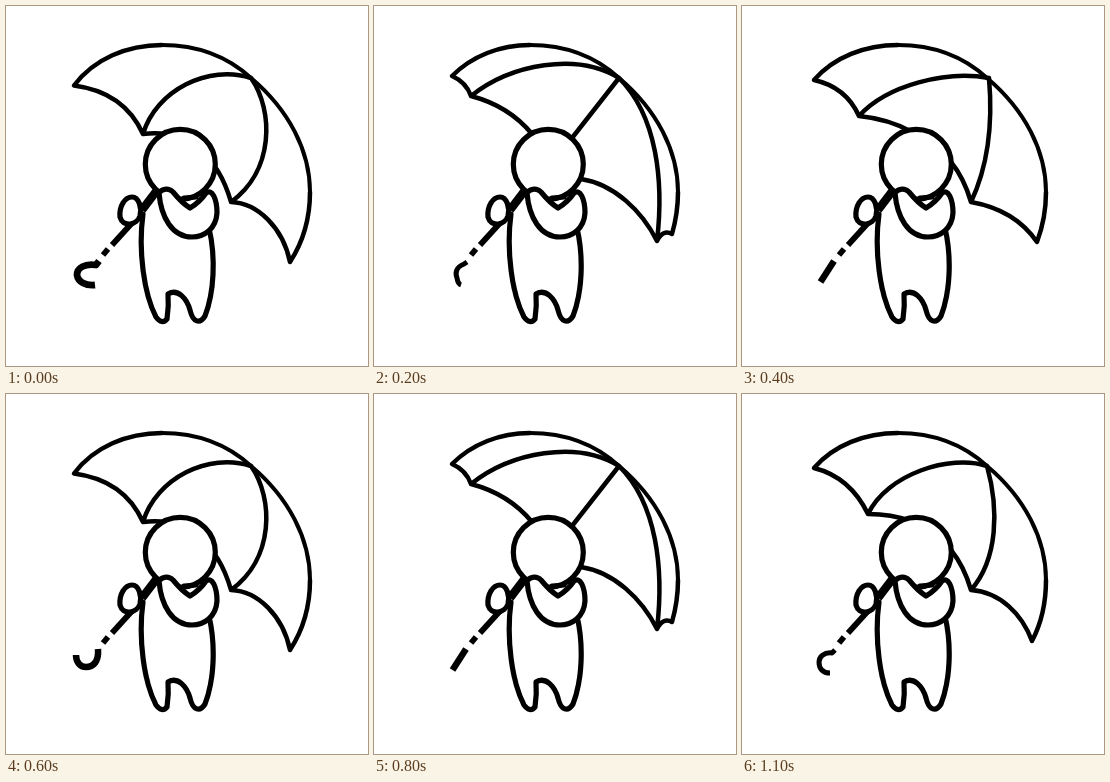
These frames come from a looping animation (362x360 px, 1.2 s). An HTML page:

```html
<!DOCTYPE html>
<html lang="en">
<head>
<meta charset="utf-8">
<title>Spinning umbrella</title>
<style>
html, body { margin: 0; width: 100%; height: 100%; overflow: hidden; background: #fff; }
svg { display: block; width: 100%; height: 100%; }
path, circle { fill: none; stroke: #000; stroke-width: 5.2; stroke-linecap: round; stroke-linejoin: round; }
.solid { fill: #fff; }
.rim { stroke-width: 4; }
.shaft { stroke-width: 5.8; stroke-linecap: butt; }
.grip { stroke-width: 8.5; }
#canopy { stroke-width: 4.5; animation: spin 600ms step-end infinite; }
#hook { stroke-width: 6; stroke-linecap: butt; animation: turn 1200ms step-end infinite; }

/* Each pose: left rim, scallops and ribs, right rim */
@keyframes spin {
  0%, 100% { d: path("M156 39C121 39 88 53 68 79.5Q118 86 137 128C150 84 203 58 245 72M137 128C180 122 212 150 225 196C268 165 268 105 245 72M225 196C252 197 277 222 284 256C297 236 304 211 304 186"); }
  16.66% { d: path("M156 39C123 39 93 51 73 75C110 80 145 105 160 130M172 128C185 105 210 82 245 72M206 168C232 175 255 195 262 222C280 175 277 115 245 72M262 222Q280 226 291 242C300 225 304 206 304 186"); }
  33.33% { d: path("M156 39C126 39 98 50 78 70Q92 76 97 90C137 58 203 46 245 72M97 90Q135 100 158 128M245 72L198 132M207 173C240 178 268 205 283 235C290 175 283 110 245 72M283 235Q289 223 298 228C302 214 304 200 304 186"); }
  50% { d: path("M156 39C125 39 96 50 75 72Q92 85 101 104C135 67 195 56 242 69M101 104Q137 107 162 126M208 174L213 184Q241 125 242 69M213 184C243 185 272 203 288 233L298 228C302 214 304 200 304 186M293 230C303 165 290 115 245 72"); }
  66.66% { d: path("M156 39C123 39 92 51 72 74Q104 81 117 110C145 79 205 64 247 72M117 110Q147 113 170 126M209 156Q222 172 229 196C246 160 251 118 247 72M229 196C257 201 280 214 295 236C301 220 304 203 304 186"); }
  83.33% { d: path("M156 39C123 39 92 51 72 74Q108 83 126 120C145 80 208 60 245 72M126 120Q150 120 168 127M209 156Q222 172 229 196C256 165 257 115 245 72M229 196C258 198 280 220 290 247C300 228 304 208 304 186"); }
}

@keyframes turn {
  0%, 100% { d: path("M93 255L90 259C79 257 71 262 71 269C72 276 80 280 89 279"); stroke-width: 6.8; }
  8.33%, 91.66% { d: path("M93 256L90 259C82 258 77 263 77 268C77 275 81 279 88 279"); }
  16.66%, 83.33% { d: path("M93 256L90 258C82 261 81 267 83 272Q84 278 87 279"); stroke-width: 5; }
  25%, 75% { d: path("M93 256L90 260C82 260 84 262 80 266Q77 270 78 277"); stroke-width: 5.4; }
  33.33%, 66.66% { d: path("M92 255L78.5 276"); stroke-width: 6.5; }
  41.66%, 58.33% { d: path("M92 256C91 267 83 276 73 269"); }
  50% { d: path("M92 255C93 268 87 273 80 273C74 273 70 268 70 261"); }
}
</style>
</head>
<body>
<svg viewBox="0 0 362 360">
  <path class="rim" d="M156 39C190 39 221 50 245 72C283 104 304 145 304 186"/>
  <path id="canopy"/>

  <!-- body and legs -->
  <path class="solid" d="M137 208C132 245 138 288 150 311Q156 319 161 313Q163 300 162 288C172 282 181 293 184 304C187 317 194 318 199 310C208 287 210 252 203 222"/>

  <!-- shaft and handle -->
  <path class="shaft grip" d="M152 183L136 204"/>
  <path class="shaft" d="M126 217L106 239"/>
  <path class="shaft" d="M102 243L97 249"/>
  <path id="hook"/>

  <circle class="solid" cx="174.3" cy="158.3" r="35"/>
  <path d="M178 192L190 191"/>
  <path class="solid" d="M114 211C113 200 119 191 126 191C133 191 136 202 134 210C131 219 117 222 114 211Z"/>
  <path class="solid" d="M153 187C157 182 163 182 167 186Q176 197 184 202Q194 196 200 187C206 182 211 193 211 207C210 223 198 231 186 231C166 231 155 211 153 187Z"/>
</svg>
</body>
</html>
```
